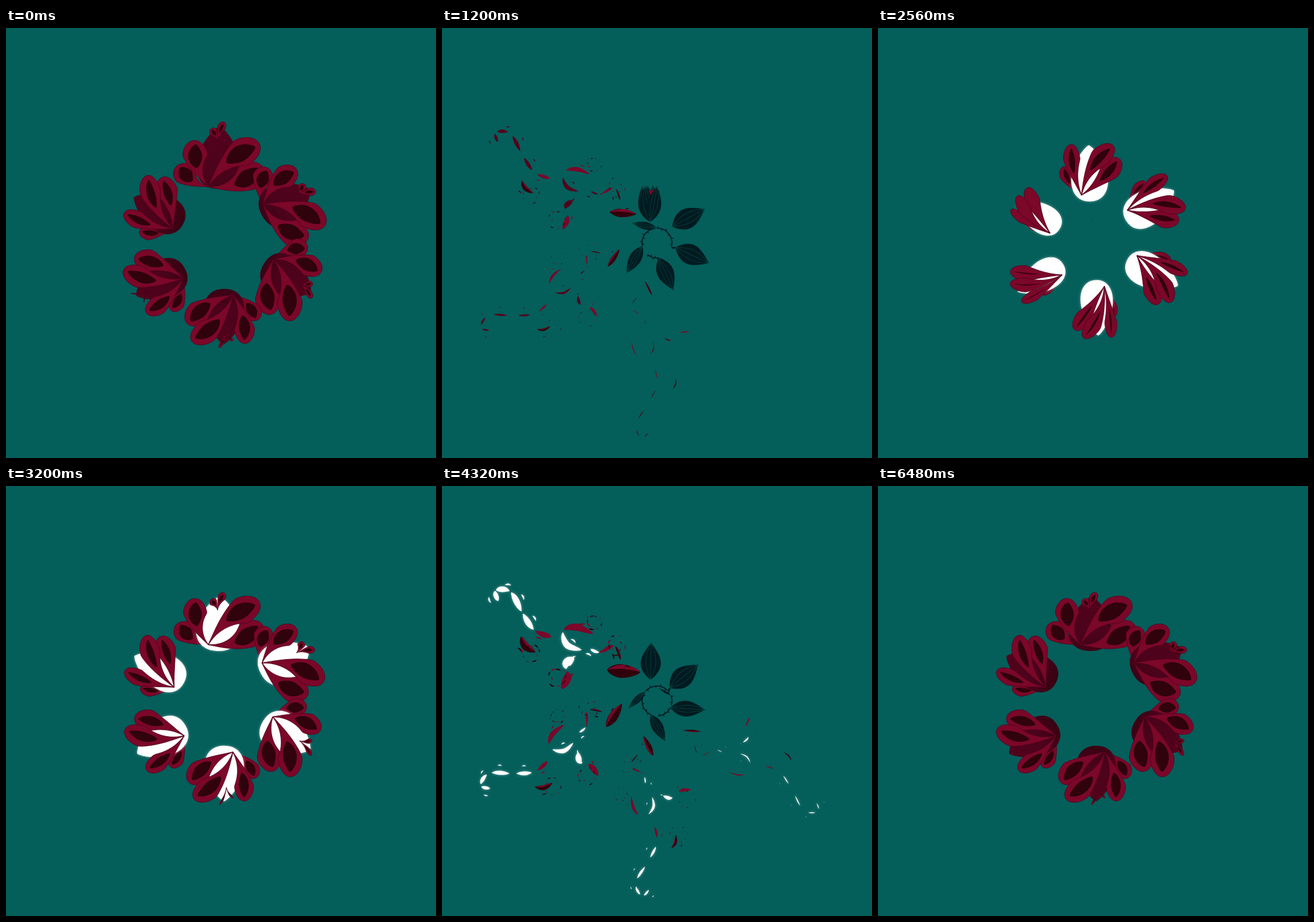
Animation of 748x748 px, one loop 6560 ms. Source, as an HTML page with a canvas:

```html
<!DOCTYPE html>
<html lang="en">
<head>
<meta charset="utf-8">
<title>Rose ring</title>
<style>
html, body { margin: 0; width: 100%; height: 100%; overflow: hidden; background: #045e5a; }
canvas { display: block; width: 748px; height: 748px; }
</style>
</head>
<body>
<canvas id="stage" width="748" height="748"></canvas>
<script>
const ctx = document.getElementById('stage').getContext('2d');
const LOOP = 6560, CYCLE = 3280, STEP = 80, LAG = 400 / 3, MID = 374;
const BG = '#045e5a', RED = '#7b0729', DARK = '#30020c', LEAF = '#001a20', VEIN = '#07403f', EDGE = '#4a0219', WHITE = '#fff';

// Four stages each: bud, half open, wide, torn
const CORE = [ // base x y, tip x y, bend, half width
  [366, 312, 368, 226, 0, 25], [370, 309, 364, 210, 0, 29], [367, 287, 372, 192, 0, 38], [366, 172, 382, 58, 24, 20]
];
const PETALS = { // tip x y, bend, half width
  leftLow: [[346, 262, 4, 3], [334, 243, 8, 7], [302, 237, 18, 19], [338, 236, 0, 4]],
  rightLow: [[399, 228, 6, 12], [408, 222, 2, 14], [442, 237, -30, 23], [436, 284, -44, 18]],
  leftTop: [[355, 224, 8, 7], [339, 206, 6, 11], [332, 196, 22, 20], [303, 226, -22, 13]],
  rightTop: [[378, 222, 16, 10], [394, 206, 20, 14], [442, 205, 26, 23], [447, 212, 60, 14]]
};
const rnd = n => { const v = Math.sin(n * 127.1 + 3.7) * 43758.5453; return v - Math.floor(v); };
const ramp = (u, a, b) => Math.max(0, Math.min(1, (u - a) / (b - a)));
const mix = (a, b, p) => a + (b - a) * p;
const easeOut = p => 1 - (1 - p) * (1 - p);
const bell = s => Math.sin(Math.PI * s);
const rad = deg => deg * Math.PI / 180;

function quad(x0, y0, x1, y1, bend) {
  const l = Math.hypot(x1 - x0, y1 - y0) || 1;
  const cx = (x0 + x1) / 2 + (y1 - y0) / l * bend, cy = (y0 + y1) / 2 - (x1 - x0) / l * bend;
  return s => [
    mix(mix(x0, cx, s), mix(cx, x1, s), s),
    mix(mix(y0, cy, s), mix(cy, y1, s), s)
  ];
}

function spline(pts) {
  const n = pts.length - 1;
  return s => {
    const i = Math.min(n - 1, Math.floor(s * n)), f = s * n - i;
    const [a, b, c, d] = [-1, 0, 1, 2].map(k => pts[Math.max(0, Math.min(n, i + k))]);
    return [0, 1].map(k => b[k] + f / 2 * (c[k] - a[k] +
      f * (2 * a[k] - 5 * b[k] + 4 * c[k] - d[k] + f * (3 * (b[k] - c[k]) + d[k] - a[k]))));
  };
}

// Shape of varying width along a curve
function ribbon(at, width, fill, edge, n = 28) {
  const back = [];
  ctx.beginPath();
  for (let i = 0; i <= n; i++) {
    const s = (1 - Math.cos(Math.PI * i / n)) / 2;
    const [x, y] = at(s), [xa, ya] = at(Math.max(0, s - .01)), [xb, yb] = at(Math.min(1, s + .01));
    const k = width(s) / (Math.hypot(xb - xa, yb - ya) || 1), nx = (yb - ya) * k, ny = (xa - xb) * k;
    ctx.lineTo(x + nx, y + ny);
    back.unshift([x - nx, y - ny]);
  }
  back.forEach(p => ctx.lineTo(...p));
  ctx.closePath();
  ctx.shadowColor = 'rgba(255,255,255,.5)';
  ctx.shadowBlur = fill === WHITE ? 4 : 0;
  ctx.fillStyle = fill;
  ctx.fill();
  ctx.shadowBlur = 0;
  if (!edge) return;
  ctx.strokeStyle = edge;
  ctx.lineWidth = .7;
  ctx.stroke();
}

// Width profiles: rounded lobe on a thin tail, and an egg
const lobe = s => s < .7 ? Math.pow(s / .7, 1.6) : Math.sqrt(Math.max(0, 1 - ((s - .7) / .3) ** 2));
const egg = s => 2.26 * Math.pow(s, .45) * Math.pow(1 - s, .8);

function pose(rows, u) {
  const q = u < 2240 ? ramp(u, 1840, 2240) : u < 3387 ? 1 + ramp(u, 2240, 3200) : 2 + ramp(u, 3387, 3520);
  const i = Math.min(2, Math.floor(q));
  return rows[i].map((v, j) => mix(v, rows[i + 1][j], q - i));
}

function petal(rows, u, x0, y0, fade) {
  const [x, y, bend, w] = pose(rows, u), r = w * fade;
  const at = quad(x0, y0, x, y, bend);
  ribbon(at, s => .5 * fade + r * lobe(s), RED, r > 1 && EDGE);
  const open = ramp(u, 1900, 2900) * .58 * r;
  if (open > .3) ribbon(s => at(mix(.44, .93, s)), s => open * Math.pow(bell(s), .7), DARK);
}

function rose(u, tone) {
  const fade = 1 - ramp(u, 3530, 3640);
  if (!fade) return;
  const [x0, y0, x1, y1, bend, w] = pose(CORE, u);
  const flare = ramp(u, 3200, 3290) * (1 - ramp(u, 3387, 3520));
  const bx = x0 - 15, by = Math.max(y0 - 11, 248);
  const draw = name => petal(PETALS[name], u, bx, by, fade * (1 + .06 * flare));
  ctx.save();
  if (u < 1840) {
    const grow = mix(.34, 1, Math.pow(ramp(u, 1200, 1840), .65));
    ctx.translate(366, 312);
    ctx.scale(grow, grow);
    ctx.translate(-366, -312);
  }
  draw('leftLow');
  ribbon(quad(x0, y0 - 8 * flare, x1, y1 - 24 * flare, bend), s => w * egg(s) * fade, tone);
  draw('rightLow');
  const bloom = ramp(u, 2700, 3100) * (1 - ramp(u, 3400, 3480));
  if (bloom) for (const side of [-1, 1]) {
    const at = quad(x1 - 4, y1 + 24 - 22 * flare, x1 - 4 + side * 12, y1 - 6 * side - 25 * flare, 4 * side);
    ribbon(at, s => 7 * bloom * lobe(s), RED, EDGE);
    ribbon(s => at(mix(.4, .9, s)), s => 3 * bloom * bell(s), DARK);
  }
  draw('leftTop');
  draw('rightTop');
  ctx.restore();
}

// Paths that the flung petals follow and break along
const STREAMS = [
  { at: spline([[386, 48], [400, 35], [411, 58], [390, 94], [374, 128], [379, 160]]), w: 6.5, n: 5, hues: 'mmmmr' },
  { at: spline([[420, 222], [415, 188], [398, 172], [380, 190], [386, 218]]), w: 8, n: 2, hues: 'rm' },
  { at: spline([[308, 220], [333, 218], [350, 205], [368, 212]]), w: 9, n: 2, hues: 'rm' },
  { at: spline([[377, 270], [388, 294], [404, 326]]), w: 14, n: 1, hues: 'd' },
  { at: spline([[354, 112], [342, 128], [342, 150]]), w: 9, n: 1, hues: 'd' },
  { at: spline([[394, 228], [398, 246], [420, 262], [404, 284]]), w: 4, n: 3, hues: 'mrd' }
];
const CURLS = [[438, 208], [338, 142], [324, 202], [422, 264]];

function sliver(x, y, deg, len, fill) {
  const dx = Math.cos(rad(deg)) * len / 2, dy = Math.sin(rad(deg)) * len / 2;
  ribbon(quad(x - dx, y - dy, x + dx, y + dy, len * .3), s => len * .13 * bell(s), fill, null, 8);
}

function burst(u, tone) {
  const life = ramp(u, 3500, 3600) * Math.pow(1 - ramp(u, 3600, 4230), 1.5);
  if (life < .02) return;
  const hue = { m: tone, r: RED, d: DARK };
  STREAMS.forEach(({ at, w, n, hues }, k) => {
    for (let i = 0; i < n; i++) {
      const mid = (i + .5) / n, half = .48 / n * mix(.35, 1, life);
      const r = w * life * mix(.7, 1, rnd(k * 9 + i));
      const part = s => at(mix(mid - half, mid + half, s));
      ribbon(part, s => r * Math.pow(bell(s), .8), hue[hues[i]]);
      if (hues[i] === 'd') ribbon(s => part(s).map((v, j) => j ? v : v + r * .7 * bell(s)), s => r * .3 * bell(s), RED);
      const [x, y] = at(mid), [x2, y2] = at(Math.min(1, mid + .02));
      const deg = Math.atan2(y2 - y, x2 - x) * 180 / Math.PI, off = (rnd(i + k) < .5 ? -1 : 1) * 11;
      sliver(x + off, y + off / 2, deg, 13 * life, hue[hues[i]]);
    }
  });
  CURLS.forEach(([x, y], k) => {
    for (let i = 0; i < 9; i++) {
      const deg = i * 40 + 50 * k, r = 8 + 9 * rnd(i + k * 9);
      sliver(x + Math.cos(rad(deg)) * r, y + Math.sin(rad(deg)) * r, deg + 90, (5 + 7 * rnd(i * 5 + k)) * life, i % 2 ? RED : DARK);
    }
  });
}

function blade(at, w, veins) {
  ribbon(at, s => w * bell(Math.pow(s, .85)), LEAF);
  if (veins) for (const k of [-.5, 0, .5]) {
    ctx.beginPath();
    for (let s = 0; s <= 1; s += .1) {
      const [x, y] = at(s);
      ctx.lineTo(x + k * w * bell(s), y);
    }
    ctx.strokeStyle = VEIN;
    ctx.lineWidth = .9;
    ctx.stroke();
  }
}

// The shoot winds inwards round the middle, then points out
function shoot(u) {
  const a = rad(mix(195, -17, easeOut(ramp(u, 250, 950)))), r = 26 + 13 * ramp(u, 800, 1040);
  return [MID + Math.sin(a) * r, MID - Math.cos(a) * r];
}

function vine(u) {
  const from = Math.max(250, u - 260, mix(300, 950, ramp(u, 640, 1000)));
  ctx.strokeStyle = LEAF;
  ctx.lineWidth = 1.8;
  ctx.beginPath();
  for (let a = from; a <= Math.min(u, 950); a += 10) ctx.lineTo(...shoot(a));
  ctx.stroke();
  for (let n = Math.ceil(from / 40); n * 40 < Math.min(u, 900); n++) {
    const [x, y] = shoot(n * 40), s = n % 2 ? .18 : -.18;
    ribbon(quad(x, y, x + (x - MID) * s, y + (y - MID) * s, 1), t => 1.3 * (1 - t), LEAF, null, 6);
  }
  const [x, y] = shoot(u), len = 64 * easeOut(ramp(u, 220, 950));
  const tilt = rad(-30 * bell(ramp(u, 420, 960)) + 3 * ramp(u, 950, 1170));
  if (len) blade(quad(x, y, x + Math.sin(tilt) * len, y - Math.cos(tilt) * len, 0), 1 + 16.5 * ramp(u, 350, 900), u > 480);
}

function sepals(u, spreads) {
  const open = easeOut(ramp(u, 1190, 1330)) + .2 * ramp(u, 1330, 1600);
  const w = 12.5 * (1 - ramp(u, 1200, 1720)), rise = ramp(u, 1200, 1300);
  if (w < .3) return;
  const x = mix(362, 366, rise), y = mix(337, 317, rise);
  for (const deg of spreads) {
    const a = rad(deg * open), len = mix(52, 63, w / 12.5);
    blade(quad(x, y, x + Math.sin(a) * len, y - Math.cos(a) * len, (deg < 0 ? 18 : -18) * open), w, w > 5);
  }
}

function scraps(u) {
  const life = ramp(u, 1420, 1560) * (1 - ramp(u, 1580, 1940));
  if (life > .03) for (let i = 0; i < 14; i++) {
    const a = (rnd(i + 9) - .5) * 4.6, r = 20 + 44 * rnd(i + 31);
    sliver(366 + Math.sin(a) * r, 318 - Math.cos(a) * r, a * 57.3 - 90 + 50 * rnd(i + 70), (5 + 11 * rnd(i + 50)) * life, LEAF);
  }
}

function flower(u, white) {
  if (u < 1200) return vine(u);
  let tone = WHITE;
  if (!white) {
    tone = ctx.createLinearGradient(360, 200, 378, 308);
    tone.addColorStop(0, '#52021c');
    tone.addColorStop(.55, '#4b031b');
    tone.addColorStop(1, '#330110');
  }
  sepals(u, [-28, 32]);
  rose(u, tone);
  sepals(u, [-95, -58, 78]);
  scraps(u);
  burst(u, tone);
}

function draw(t) {
  ctx.setTransform(1, 0, 0, 1, 0, 0);
  ctx.fillStyle = BG;
  ctx.fillRect(0, 0, 748, 748);
  for (let k = -1; k < 2; k++) {
    for (let i = 0; i < 6; i++) {
      const u = t - i * LAG - k * CYCLE;
      if (u < 0 || u > 4230) continue;
      ctx.setTransform(1, 0, 0, 1, MID, MID);
      ctx.rotate(i * Math.PI / 3);
      ctx.translate(-MID, -MID);
      flower(u, k === 0);
    }
  }
}

const start = performance.now();
function tick() {
  const t = (performance.now() - start) % LOOP;
  draw(Math.floor(t / STEP) * STEP);
  requestAnimationFrame(tick);
}
tick();
</script>
</body>
</html>
```
